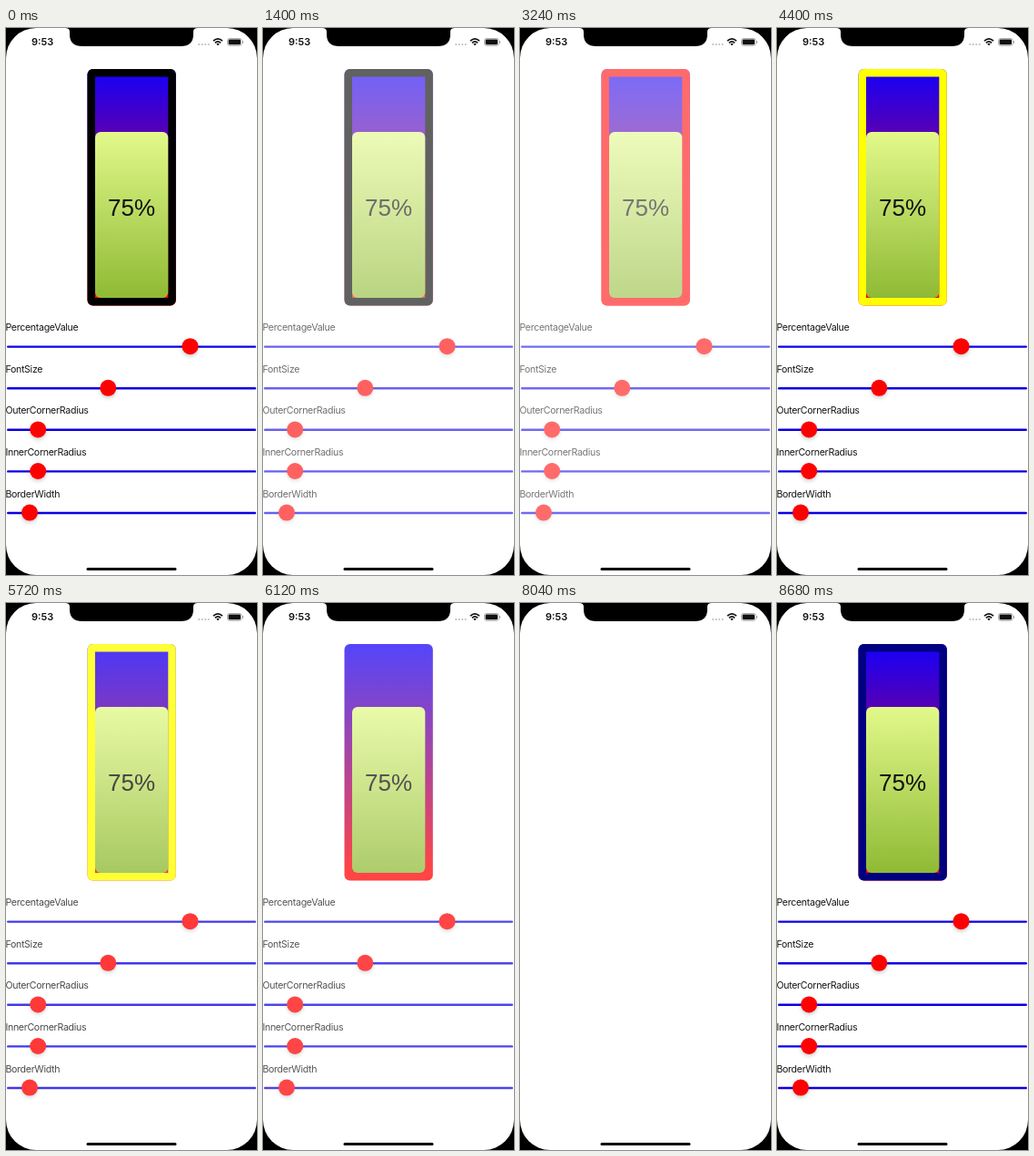
Animation, 276 px wide and 600 px high, one loop 8720 ms. Source, as an HTML page:

```html
<!DOCTYPE html>
<html lang="en">
<head>
<meta charset="utf-8">
<style>
  html, body { margin: 0; width: 100%; height: 100%; overflow: hidden; background: #000; }
  svg { display: block; width: 276px; height: 600px; }
  text { font-family: Inter, "Liberation Sans", sans-serif; }
  .label { font-size: 10.6px; letter-spacing: -.3px; fill: #161616; }
  .knob { filter: drop-shadow(0 2px 2px rgba(0, 0, 0, .2)); }
</style>
</head>
<body>
<svg viewBox="0 0 276 600">
  <defs>
    <linearGradient id="back" gradientUnits="userSpaceOnUse" x1="0" y1="45" x2="0" y2="304">
      <stop stop-color="#1400fa"/><stop offset=".96" stop-color="#f00"/>
    </linearGradient>
    <linearGradient id="level" x2="0" y2="1">
      <stop stop-color="#e2f98a"/><stop offset="1" stop-color="#8fba35"/>
    </linearGradient>
  </defs>
  <rect width="276" height="600" rx="33" fill="#fff"/>

  <g id="content">
    <rect x="89.5" y="45" width="97.3" height="259.5" rx="6" fill="url(#back)"/>
    <rect id="border" x="89.5" y="45" width="97.3" height="259.5" rx="6"/>
    <rect x="98" y="53.5" width="80.3" height="242.5" fill="url(#back)"/>
    <rect x="98" y="114" width="80.3" height="182" rx="6" fill="url(#level)"/>
    <text x="138" y="205.5" text-anchor="middle" style="font:26px 'Liberation Sans', Arial, sans-serif" fill="#111">75%</text>
    <g id="sliders"></g>
  </g>

  <!-- status bar, notch and home indicator -->
  <path d="M65 0Q70 0 70 4V7Q70 20 84 20H192Q206 20 206 7V4Q206 0 211 0Z"/>
  <text x="28" y="19.4" font-size="11" font-weight="600" fill="#111">9:53</text>
  <path d="M212.2 18H223" stroke="#bbb" stroke-width="2" stroke-linecap="round" stroke-dasharray="0 3.5"/>
  <g fill="none" stroke="#111" stroke-width="1.7">
    <path d="M228 14.2Q233 9.6 238 14.2M229.9 16.3Q233 13.5 236.1 16.3"/>
    <path d="M231.3 17.5Q233 16 234.7 17.5L233 19.3Z" fill="#111" stroke="none"/>
  </g>
  <rect x="243.5" y="11.5" width="15.6" height="7.8" rx="2.2" fill="none" stroke="#999" stroke-width=".8"/>
  <rect x="244.6" y="12.6" width="13.4" height="5.6" rx="1.2" fill="#111"/>
  <rect x="260" y="14" width="1" height="2.8" rx=".5" fill="#999"/>
  <rect x="88.5" y="592" width="99" height="3" rx="1.5"/>
</svg>
<script>
const LOOP = 8720, FADE = 240, GAP = 20;
const cuts = [1569, 3399, 5927, 8040];          // middle of each blank moment
const colors = ['#000', '#f00', '#ff0', 'none', '#000080'];
const sliders = [
  ['PercentageValue', 202.5], ['FontSize', 112.3], ['OuterCornerRadius', 35.2],
  ['InnerCornerRadius', 35.2], ['BorderWidth', 26]
];
const byId = id => document.getElementById(id);
const content = byId('content'), border = byId('border');

byId('sliders').innerHTML = sliders.map(([name, x], i) => {
  const y = 349.2 + 45.6 * i;
  return `<text class="label" x="-.6" y="${y - 17}">${name}</text>
    <path d="M2.2 ${y + .4}H273.8" stroke="#0c00e4" stroke-width="2.4" stroke-linecap="round"/>
    <circle class="knob" cx="${x}" cy="${y}" r="9" fill="#f00"/>`;
}).join('');

function draw(now) {
  const t = now % LOOP;
  const nearest = Math.min(...cuts.map(c => Math.abs(t - c)));
  content.setAttribute('opacity', Math.max(0, Math.min(1, (nearest - GAP) / FADE)));
  border.setAttribute('fill', colors[cuts.filter(c => t >= c).length]);
}

const start = performance.now();
function tick() {
  draw(performance.now() - start);
  requestAnimationFrame(tick);
}
tick();
</script>
</body>
</html>
```
